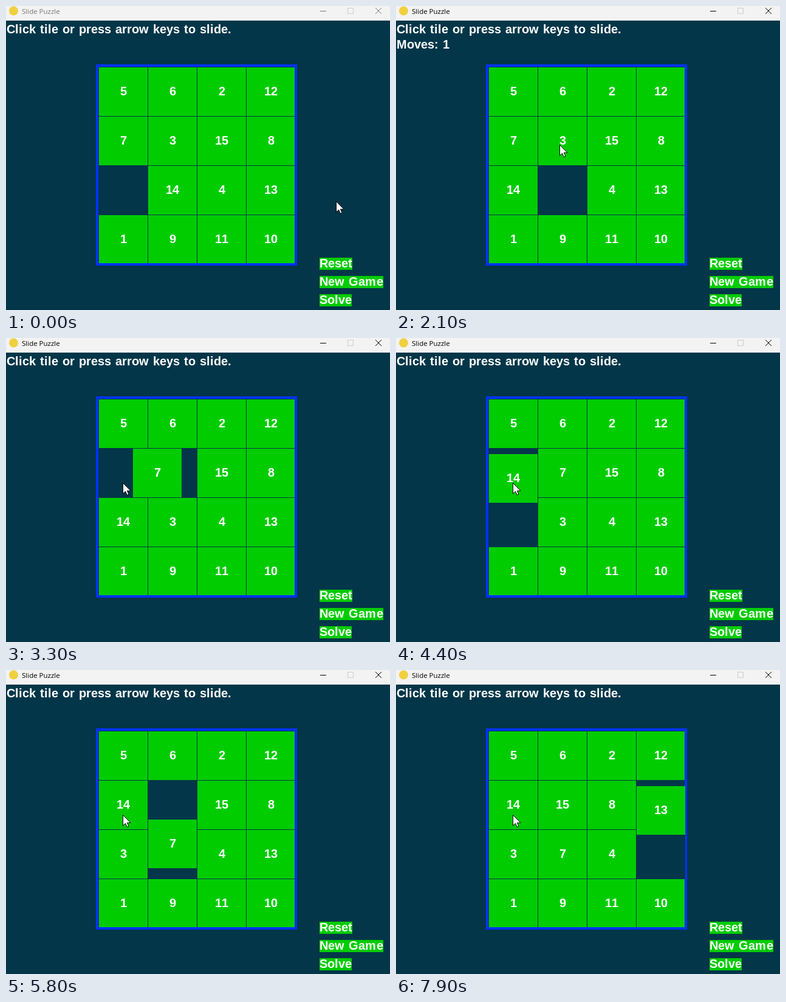
Write an HTML page with a canvas that moves like this. It is 632 by 500 pixels and loops after 8 s.

```html
<!DOCTYPE html>
<html lang="en">
<head>
<meta charset="utf-8">
<title>Slide Puzzle</title>
<style>
  html, body { margin: 0; width: 100%; height: 100%; overflow: hidden; background: #033649; }
  canvas { display: block; }
</style>
</head>
<body>
<canvas id="stage" width="632" height="500"></canvas>
<script>
const ctx = document.getElementById('stage').getContext('2d');
const LOOP = 8000, STEP = 100;
const BG = '#033649', GREEN = '#00cc00', BLUE = '#0032ff';
const TILE = 80, PITCH = TILE + 1, LEFT = 153, TOP = 101;
const FOCUS_TIME = 900;

const START = [5, 6, 2, 12, 7, 3, 15, 8, 0, 14, 4, 13, 1, 9, 11, 10];

// A slide moves 8 px at 30 steps a second and rests on its last step.
const SPEED = 0.24, LAST_STEP = 72, SLIDE_TIME = 400;
const slides = [
  { tile: 14, start: 1367 }, { tile: 3, start: 2267 }, { tile: 7, start: 3067 },
  { tile: 14, start: 4100 }, { tile: 3, start: 4867 }, { tile: 7, start: 5533 },
  { tile: 15, start: 6200 }, { tile: 8, start: 6933 }, { tile: 13, start: 7600 }
];

// The pointer glides to each place in turn and waits there.
const HOME = { x: 543, y: 321 };
const glides = [
  { start: 0, time: 900, x: 281, y: 296 },
  { start: 1000, time: 200, x: 272, y: 294 },
  { start: 1700, time: 400, x: 269, y: 228 },
  { start: 2400, time: 400, x: 192, y: 238 }
];
const ARROW = new Path2D('M.5 .5V18L4.6 14.2 7.3 20.3 10 19.1 7.4 13.2H13Z');

const ease = u => u * u * (3 - 2 * u);
const clamp01 = u => Math.min(1, Math.max(0, u));

const ADVANCE = { ' ': 7, m: 19 };
const advance = ch => ADVANCE[ch] || Math.round(ctx.measureText(ch).width);
const textWidth = s => [...s].reduce((w, ch) => w + advance(ch), 0);

function rect(color, x, y, w, h) {
  ctx.fillStyle = color;
  ctx.fillRect(x, y, w, h);
}

// Bold text set on whole pixels, x and y being its top left corner
function label(s, x, y) {
  ctx.fillStyle = '#fff';
  for (const ch of s) {
    ctx.fillText(ch, x, y + 16);
    x += advance(ch);
  }
}

function drawTile(n, x, y) {
  const s = String(n);
  rect(GREEN, x, y, TILE, TILE);
  label(s, x + 40 - Math.floor(textWidth(s) / 2), y + 30);
}

const cellX = i => LEFT + (i % 4) * PITCH;
const cellY = i => TOP + Math.floor(i / 4) * PITCH;

function boardAt(t) {
  const cells = START.slice();
  let moves = 0;
  for (const { tile, start } of slides) {
    if (t < start) break;
    const from = cells.indexOf(tile), to = cells.indexOf(0);
    if (t < start + SLIDE_TIME) {
      const offset = Math.min(LAST_STEP, Math.round((t - start) * SPEED));
      return { cells, moves, sliding: { tile, from, to, offset } };
    }
    cells[to] = tile;
    cells[from] = 0;
    moves++;
  }
  return { cells, moves };
}

function drawBoard({ cells, sliding }) {
  cells.forEach((n, i) => n && drawTile(n, cellX(i), cellY(i)));
  ctx.strokeStyle = BLUE;
  ctx.lineWidth = 4;
  ctx.strokeRect(LEFT - 3, TOP - 3, 4 * TILE + 7, 4 * TILE + 7);
  if (sliding) {
    const { tile, from, to, offset } = sliding;
    const x = cellX(from), y = cellY(from);
    rect(BG, x, y, TILE, TILE);
    drawTile(tile, x + Math.sign(cellX(to) - x) * offset, y + Math.sign(cellY(to) - y) * offset);
  }
}

function drawTitleBar(active) {
  const ink = active ? '#000' : '#777';
  rect('#f3f3f3', 0, 0, 632, 24);
  ctx.fillStyle = '#f0d040';
  ctx.beginPath();
  ctx.arc(12.5, 8, 7.5, 0, 7);
  ctx.fill();
  ctx.font = '11.5px "Open Sans", "Noto Sans", sans-serif';
  ctx.fillStyle = ink;
  ctx.fillText('Slide Puzzle', 26, 13);
  rect(ink, 517, 8, 10, 1);
  ctx.lineWidth = 1;
  ctx.strokeStyle = '#ccc';
  ctx.strokeRect(562.5, 3.5, 9, 9);
  ctx.strokeStyle = ink;
  ctx.stroke(new Path2D('M608 3l10 10m0-10l-10 10'));
}

function drawPointer(t) {
  let { x, y } = HOME;
  for (const g of glides) {
    const e = ease(clamp01((t - g.start) / g.time));
    x += (g.x - x) * e;
    y += (g.y - y) * e;
  }
  ctx.save();
  ctx.translate(Math.round(x), Math.round(y));
  ctx.fillStyle = '#fff';
  ctx.strokeStyle = '#000';
  ctx.lineWidth = 1;
  ctx.fill(ARROW);
  ctx.stroke(ARROW);
  ctx.restore();
}

function draw(t) {
  const state = boardAt(t);
  rect(BG, 0, 0, 632, 500);
  drawTitleBar(t >= FOCUS_TIME);
  ctx.font = 'bold 20px "Liberation Sans", Arial, sans-serif';
  label('Click tile or press arrow keys to slide.', 1, 29);
  if (state.moves && !state.sliding) label('Moves: ' + state.moves, 1, 54);
  drawBoard(state);
  ['Reset', 'New Game', 'Solve'].forEach((s, i) => {
    const y = 414 + i * 30;
    rect(GREEN, 516, y, textWidth(s), 20);
    label(s, 516, y);
  });
  drawPointer(t);
}

const origin = performance.now();
function tick() {
  const t = (performance.now() - origin) % LOOP;
  draw(Math.floor(t / STEP) * STEP);
  requestAnimationFrame(tick);
}
tick();
</script>
</body>
</html>
```
